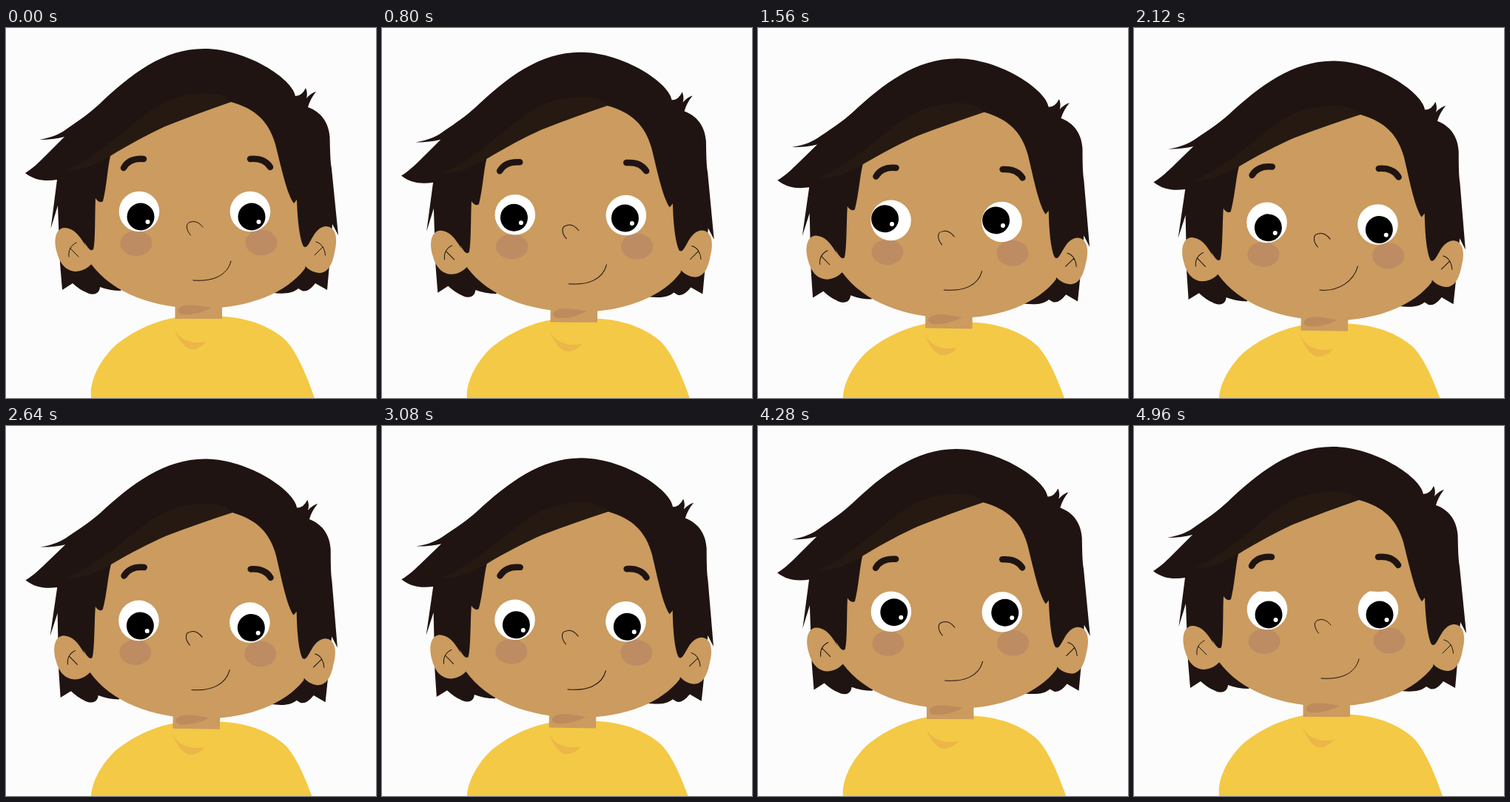
These frames come from a looping animation (500x500 px, 5 s). An HTML page:

```html
<!DOCTYPE html>
<html lang="en">
<head>
<meta charset="utf-8">
<title>Smiling child</title>
<style>
  html, body { margin: 0; height: 100%; overflow: hidden; background: #fcfcfc; }
  svg { display: block; width: 100vw; height: 100vh; }
  .skin { fill: #cb9b5f; }
  .hair { fill: #1f1412; }
  .line { fill: none; stroke: #1a1210; stroke-linecap: round; }
  .brow { fill: none; stroke: #1f1412; stroke-width: 8.5; stroke-linecap: round; }
  .cheek { fill: #bd8c63; }
</style>
</head>
<body>
<svg viewBox="0 0 500 500">
  <defs>
    <clipPath id="socket"><circle r="28"/></clipPath>
    <g id="eye">
      <circle r="27.3" fill="#fff"/>
      <g class="pupil">
        <circle r="18.5"/>
        <circle cx="9.5" cy="7" r="3" fill="#fff"/>
      </g>
      <g clip-path="url(#socket)"><ellipse class="skin lid" rx="60" ry="28"/></g>
    </g>
  </defs>

  <g id="shirt">
    <path fill="#f4c945" d="M115 500C112 470 135 440 150 427C175 407 205 395 230 391C250 388 285 389 295 390C330 392 360 405 378 422C395 440 408 475 417 500L421 512H117Z"/>
    <path id="collar" fill="#ecb648" d="M227 404C232 420 248 428 271 424C262 434 250 437 243 431C235 424 230 415 227 404Z"/>
  </g>

  <g id="head">
    <path class="skin" d="M228.5 365H292V393H228.5Z"/>
    <path class="hair" d="M45 151C62 148 74 143 84 135C100 124 113 115 126 103C168 63 212 28 268 28C325 28 388 69 391 92Q400 92 405 81Q408 88 406 95Q412 88 419 86Q411 96 408 107C425 113 436 127 437.5 147C438 165 438 178 440 190L449 280L441 265L437 320L434 354L418 345Q408 358 400 355L395 352C386 360 372 359 361 358L330 330H170L155 355Q140 355 127 350C126 362 114 361 108 357Q100 354 90 345L76 354L73 318L70 240L60.5 271L69 205C55 207 40 207 26 196C36 190 46 180 53 173L79 147Q64 151 45 151Z"/>
    <path fill="#251912" d="M304 100C292 84 250 85 215 100C180 116 145 160 82 193C108 192 125 182 141 173Z"/>
    <path class="skin" d="M79 270C66 271 64 288 69 304C74 323 85 329 95 329C108 328 116 320 122 310L112 300C102 287 96 271 79 270Z"/>
    <path class="skin" d="M432 268C446 268 449 285 444 303C440 325 432 331 423 331C411 330 403 322 398 312L405 297C413 290 416 270 432 268Z"/>
    <path class="skin" d="M304 100C337 109 355 126 364 157C373 193 380 225 389 237L393 232C394 262 397 285 402 295C405 298 409 294 412 288L404 325C380 357 330 379 265 379C200 379 145 359 115 319L106 289C110 297 115 303 118 299C121 290 120 250 121 230C125 236 129 236 131 234C136 215 137 190 141 173C165 158 195 142 215 133C245 121 275 110 304 100Z"/>
    <path fill="#be8b5c" d="M233 380C238 372 255 374 278 378C266 384 250 389 237 387C232 385 232 382 233 380Z"/>
    <ellipse class="cheek" cx="176" cy="291" rx="21.5" ry="17"/>
    <ellipse class="cheek" cx="345" cy="290" rx="21.5" ry="17.5"/>
    <path class="line" d="M95 290C87 294 84 301 85 309M87 298L98 309M419 289C427 291 431 299 431.5 307M428 296L417 307"/>
    <path class="line" d="M249.5 280C243 273 242 263 250 262C256 260 262 264 266 269"/>
    <path class="line" id="mouth"/>
    <use href="#eye" x="180" y="248"/>
    <use href="#eye" x="330" y="248"/>
    <path class="brow" d="M159 189C164 180 172 176 186 177M330 177C343 176 352 180 357 188"/>
  </g>
</svg>
<script>
const LOOP = 5000;
const $ = selector => document.querySelector(selector);
const [shirt, collar, head, mouth, brows, pupil, lid] =
  ['#shirt', '#collar', '#head', '#mouth', '.brow', '.pupil', '.lid'].map($);

// Sine ease from 0 to 1 between two times
const ease = (t, from, to) => {
  const k = Math.min(1, Math.max(0, (t - from) / (to - from)));
  return (1 - Math.cos(Math.PI * k)) / 2;
};
// Rise, hold, fall
const pulse = (t, a, b, c, d) => ease(t, a, b) - ease(t, c, d);
const move = (el, x, y, extra = '') => el.setAttribute('transform', `translate(${x} ${y})${extra}`);

function draw(now) {
  const t = now % LOOP;
  const sink = pulse(t, 0, 2220, 2680, 4920);
  const left = pulse(t, 540, 1200, 1600, 2060);
  const right = pulse(t, 3160, 3580, 4100, 4540);
  const smile = pulse(t, 1800, 2100, 2400, 2760);
  const blink = pulse(t, 4540, 4770, 4770, 5000);

  move(shirt, 0, 10 * sink);
  move(collar, -2 * sink, 0);
  move(head, 0, 16.4 * sink, ` rotate(${sink} 265 217)`);
  move(pupil, 2 - 10 * left + 3 * right, 7 - 9 * left - 9.5 * right);
  move(lid, 0, -56 * (1 - blink));
  move(brows, 0, -4.5 * smile);
  const low = 341 - 3 * smile, high = 315 - 10 * smile;
  mouth.setAttribute('d', `M253 ${low}C279 ${low + 2} 299 ${high + 20} 304 ${high}`);
  requestAnimationFrame(draw);
}
draw(performance.now());
</script>
</body>
</html>
```
